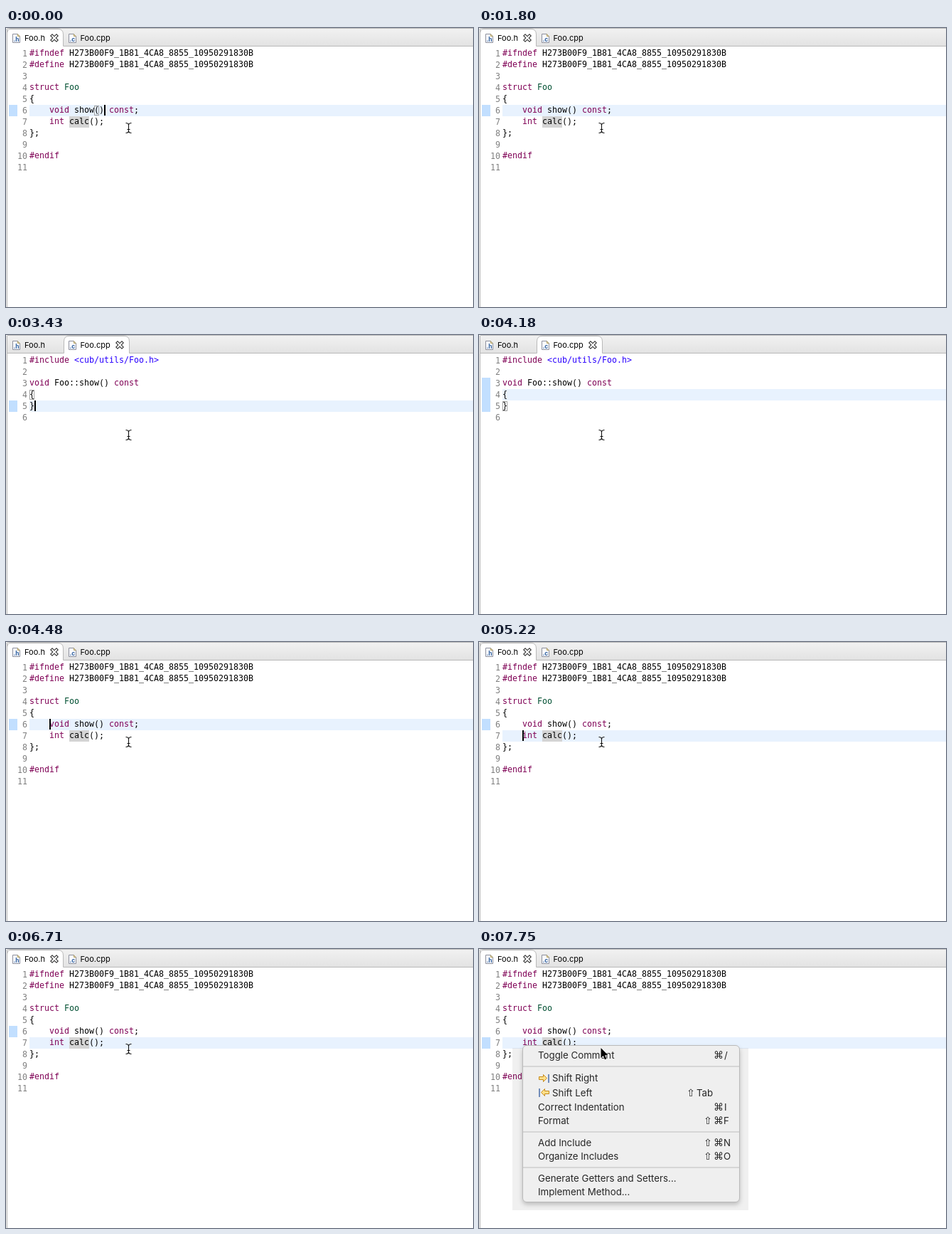
An HTML page for the animation above (8000 ms loop, 657 px wide and 392 px high).

```html
<!DOCTYPE html>
<html lang="en">
<head>
<meta charset="utf-8">
<title>Code editor</title>
<style>
html, body { margin: 0; width: 100%; height: 100%; overflow: hidden; background: #fff; }
body { position: relative; }
body * { box-sizing: border-box; }
svg, pre, i { position: absolute; margin: 0; }
svg { left: 0; top: 0; width: 657px; height: 392px; font-family: Inter, "Open Sans", sans-serif; }
.tabs { font-size: 11px; }
.edge { fill: none; stroke: #b9b9b9; }

pre { left: 33px; top: 27px; font: 11.63px/16px "DejaVu Sans Mono", monospace; color: #000; }
pre b { font-weight: 400; color: #7f0055; }
pre u { text-decoration: none; color: #005032; }
pre em { font-style: normal; color: #2a00ff; }
.nums { left: 10px; top: 28px; width: 20px; text-align: right; color: #808080; }

/* Everything on the text grid starts at line 1, column 0: 7 x 16 px cells. */
#row { left: 33px; top: 28px; width: 624px; height: 16px; background: #e8f2fe; }
.range { left: 4px; top: 28px; width: 12px; height: 16px; background: #c2dfff; }
#body { top: 60px; height: 32px; }
#word { left: 89px; top: 124px; width: 28px; height: 16px; background: #d4d4d4; }
#caret { left: 33px; top: 28px; width: 2px; height: 15px; background: #000; }
#match { left: 33px; top: 29px; width: 7px; height: 14px; border: 1px solid #a0a0a0; }

.h, .c, #row, .range, #caret, #match, #beam, #arrow, #menu {
  animation: 8s step-end -8ms infinite;
}
.h { animation-name: header; }
.c { animation-name: source; }
#row { animation-name: row; }
#range { animation-name: range; }
#body { animation-name: body; }
#caret { animation-name: place, blink; }
#match { animation-name: match; }
#beam { animation-name: beam; }
#arrow { animation-name: arrow; }
#menu { animation-name: menu; }

@keyframes header { 0%, 56%, 100% { opacity: 1; } 31.75% { opacity: 0; } }
@keyframes source { 0%, 56%, 100% { opacity: 0; } 31.75% { opacity: 1; } }
@keyframes row {
  0%, 56% { transform: translateY(80px); }
  31.75%, 42.875% { transform: translateY(64px); }
  37.375% { transform: translateY(80px); }
  44.75% { transform: translateY(48px); }
  65.25%, 74.625%, 100% { transform: translateY(96px); }
  67.125% { transform: translateY(112px); }
}
@keyframes range {
  0%, 56% { transform: translateY(80px); }
  31.75% { transform: translateY(64px); }
  87.625%, 100% { transform: translateY(96px); }
}
@keyframes body { 0%, 56%, 100% { opacity: 0; } 50.375% { opacity: 1; } }
@keyframes place {
  0% { transform: translate(105px, 80px); }
  15%, 56% { transform: translate(28px, 80px); }
  31.75%, 42.875% { transform: translate(7px, 64px); }
  37.375% { transform: translate(0, 80px); }
  44.75% { transform: translate(7px, 48px); }
  65.25%, 74.625% { transform: translate(28px, 96px); }
  67.125% { transform: translate(14px, 112px); }
  78.25% { transform: translate(35px, 96px); }
  80.125%, 100% { transform: translate(42px, 96px); }
}
@keyframes blink {
  0%, 9.375%, 15%, 30%, 56%, 65.25%, 74.625%, 91.375% { opacity: 1; }
  1.875%, 22.5%, 52.25%, 63.5%, 70.875%, 83.875%, 95%, 100% { opacity: 0; }
}
@keyframes match {
  0% { opacity: 1; transform: translate(91px, 80px); }
  15%, 39.25%, 56%, 100% { opacity: 0; transform: none; }
  31.75%, 42.875% { opacity: 1; transform: translateY(48px); }
  44.75% { opacity: 1; transform: translateY(64px); }
}
@keyframes beam { 0% { opacity: 1; } 95%, 100% { opacity: 0; } }
@keyframes arrow { 0% { opacity: 0; } 95%, 100% { opacity: 1; } }
@keyframes menu { 0% { opacity: 0; } 96.875%, 100% { opacity: 1; } }
</style>
</head>
<body>

<svg class="tabs" viewBox="0 0 657 392">
  <defs>
    <linearGradient id="bar" x2="0" y2="1">
      <stop stop-color="#f2f2f2"/><stop offset="1" stop-color="#e2e2e2"/>
    </linearGradient>
    <g id="page">
      <path d="M9.5 8.5h7l3 3v9h-10z" fill="#fbfcff" stroke="#8c8f9c"/>
      <path d="M16.500 8.500v3h3" fill="#e8dcae" stroke="#b09c5c"/>
    </g>
    <g id="close" fill="none" stroke-linecap="square">
      <path d="M-3 -3L3 3M3 -3L-3 3" stroke="#303030" stroke-width="4.200"/>
      <path d="M-3 -3L3 3M3 -3L-3 3" stroke="#fff" stroke-width="2"/>
    </g>
  </defs>
  <rect width="1" height="392" fill="#f0f0f0"/>
  <rect x="1" width="656" height="26" fill="url(#bar)"/>
  <path class="edge" d="M2 .5H657M1.500 1V392"/>
  <g class="h">
    <path d="M2 26V6Q2 1.500 7 1.500H73Q80.500 1.500 80.500 9V26z" fill="#fff"/>
    <path class="edge" d="M2 6Q2 1.500 7 1.500H73Q80.500 1.500 80.500 9V25.500H657"/>
    <use href="#close" x="68" y="14"/>
  </g>
  <g class="c">
    <path d="M81.500 26V9Q81.500 1.500 89 1.500H166Q173.500 1.500 173.500 9V26z" fill="#fff"/>
    <path class="edge" d="M2 25.500H81.500V9Q81.500 1.500 89 1.500H166Q173.500 1.500 173.500 9V25.500H657"/>
    <use href="#close" x="160" y="14"/>
  </g>
  <use href="#page"/>
  <use href="#page" x="79"/>
  <g font-size="8.500" font-weight="700" fill="#2d5f9e">
    <text x="10.500" y="18.500">.h</text>
    <text x="89.500" y="18.500">.c</text>
  </g>
  <text x="26" y="18">Foo.h</text>
  <text x="104.500" y="18">Foo.cpp</text>
</svg>

<i id="row"></i>
<i id="range" class="range"></i>
<i id="body" class="range"></i>

<div class="h">
<i id="word"></i>
<pre class="nums">1
2
3
4
5
6
7
8
9
10
11</pre>
<pre><b>#ifndef</b> H273B00F9_1B81_4CA8_8855_10950291830B
<b>#define</b> H273B00F9_1B81_4CA8_8855_10950291830B

<b>struct</b> <u>Foo</u>
{
    <b>void</b> show() <b>const</b>;
    <b>int</b> calc();
};

<b>#endif</b></pre>
</div>

<div class="c">
<pre class="nums">1
2
3
4
5
6</pre>
<pre><b>#include</b> <em>&lt;cub/utils/Foo.h&gt;</em>

<b>void</b> Foo::show() <b>const</b>
{
}</pre>
</div>

<i id="match"></i>
<i id="caret"></i>

<svg viewBox="0 0 657 392">
  <path id="beam" d="M168.500 133.500Q172.500 133.500 172.500 136.500Q172.500 133.500 176.500 133.500M172.500 136V145M168.500 147.500Q172.500 147.500 172.500 144.500Q172.500 147.500 176.500 147.500M170.500 142.500H174.500" fill="none" stroke="#111" stroke-width="1.100"/>

  <g id="menu" font-size="13.300" fill="#262626">
    <filter id="soft" x="-10%" y="-10%" width="120%" height="120%"><feGaussianBlur stdDeviation="3"/></filter>
    <path d="M47 139H379V367H47z" fill="#000" fill-opacity=".06"/>
    <rect x="61" y="139" width="306" height="220" rx="6" fill="#000" fill-opacity=".22" filter="url(#soft)"/>
    <rect x="61.500" y="135.500" width="305" height="220" rx="5.500" fill="#efefef" stroke="#bababa"/>
    <path d="M62 165H366M62 257H366M62 307H366" stroke="#d6d6d6" stroke-width="2"/>

    <text x="83" y="154">Toggle Comment</text>
    <text x="103" y="186">Shift Right</text>
    <text x="103" y="207">Shift Left</text>
    <text x="83" y="227">Correct Indentation</text>
    <text x="83" y="246">Format</text>
    <text x="83" y="277">Add Include</text>
    <text x="83" y="296">Organize Includes</text>
    <text x="83" y="327">Generate Getters and Setters...</text>
    <text x="83" y="346">Implement Method...</text>

    <text x="345" y="154">/</text>
    <text x="306" y="207">Tab</text>
    <text x="345" y="227">I</text>
    <text x="344" y="246">F</text>
    <text x="344" y="277">N</text>
    <text x="344" y="296">O</text>
    <g font-family="DejaVu Sans, sans-serif" font-size="14">
      <text x="330" y="154">⌘</text>
      <text x="292" y="207">⇧</text>
      <text x="330" y="227">⌘</text>
      <text x="316" y="246">⇧</text><text x="330" y="246">⌘</text>
      <text x="316" y="277">⇧</text><text x="330" y="277">⌘</text>
      <text x="316" y="296">⇧</text><text x="330" y="296">⌘</text>
    </g>

    <g fill="#ffe08a" stroke="#c58a1c">
      <path d="M84.500 179.500h6v-3l5 5l-5 5v-3h-6z"/>
      <path d="M98.500 199.500h-6v-3l-5 5l5 5v-3h6z"/>
    </g>
    <path d="M98 176V188M85 196V208" stroke="#4a6ea9" stroke-width="1.500"/>
  </g>

  <path id="arrow" d="M171.500 139V153L174.800 150L177 155.200L179.300 154.200L177.100 149.200H181.500z" fill="#000" stroke="#fff" stroke-width="1" paint-order="stroke"/>
</svg>

</body>
</html>
```
